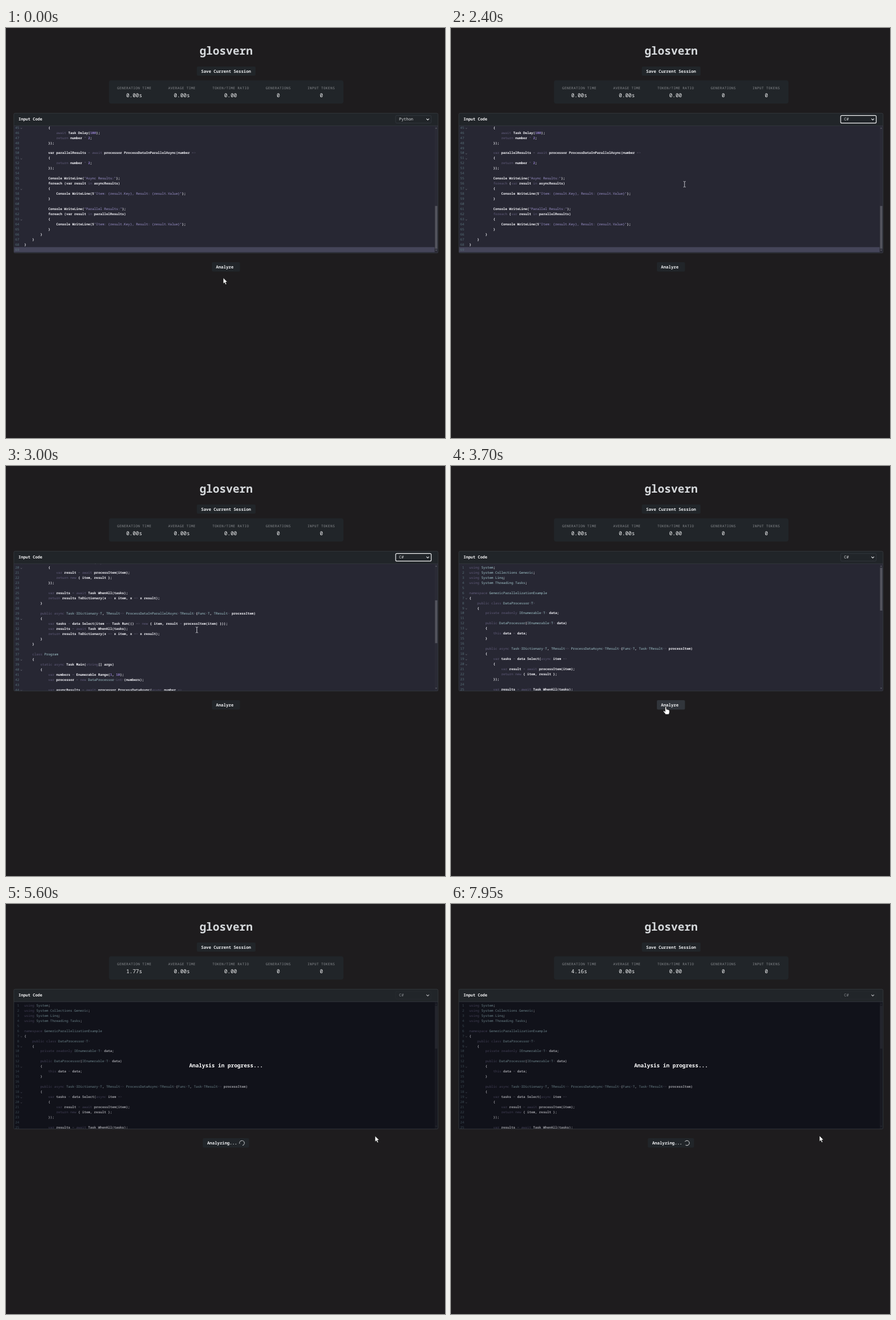
Recreate the animation shown at these times as an HTML page. Size 774 by 723 pixels, loop 8000 ms.

```html
<!DOCTYPE html>
<html lang="en">
<head>
<meta charset="utf-8">
<title>Code analysis</title>
<style>
html, body { margin: 0; width: 100%; height: 100%; overflow: hidden; background: #1e1c1e; }
svg { display: block; width: 774px; height: 723px; }
text { font-family: "Noto Sans Mono", "DejaVu Sans Mono", monospace; white-space: pre; text-rendering: geometricPrecision; }
.b { font-weight: 700; }
.mid { text-anchor: middle; }
.code text { font-size: 5.86px; fill: #f3f3f8; font-weight: 700; }
.code .k { fill: #625d7c; font-weight: 400; }
.code .o { fill: #555366; font-weight: 400; }
.code .t { fill: #a6cbd1; font-weight: 500; }
.code .s { fill: #a096d0; font-weight: 500; }
.code .n { fill: #9480cc; }
.code .ln { fill: #587079; font-weight: 400; text-anchor: end; }
</style>
</head>
<body>
<svg id="stage" viewBox="0 0 774 723"></svg>
<script>
const SOURCE = `using System;
using System.Collections.Generic;
using System.Linq;
using System.Threading.Tasks;

namespace GenericParallelizationExample
{
    public class DataProcessor<T>
    {
        private readonly IEnumerable<T> data;

        public DataProcessor(IEnumerable<T> data)
        {
            this.data = data;
        }

        public async Task<IDictionary<T, TResult>> ProcessDataAsync<TResult>(Func<T, Task<TResult>> processItem)
        {
            var tasks = data.Select(async item =>
            {
                var result = await processItem(item);
                return new { item, result };
            });

            var results = await Task.WhenAll(tasks);
            return results.ToDictionary(x => x.item, x => x.result);
        }

        public async Task<IDictionary<T, TResult>> ProcessDataInParallelAsync<TResult>(Func<T, TResult> processItem)
        {
            var tasks = data.Select(item => Task.Run(() => new { item, result = processItem(item) }));
            var results = await Task.WhenAll(tasks);
            return results.ToDictionary(x => x.item, x => x.result);
        }
    }

    class Program
    {
        static async Task Main(string[] args)
        {
            var numbers = Enumerable.Range(1, 10);
            var processor = new DataProcessor<int>(numbers);

            var asyncResults = await processor.ProcessDataAsync(async number =>
            {
                await Task.Delay(100);
                return number * 2;
            });

            var parallelResults = await processor.ProcessDataInParallelAsync(number =>
            {
                return number * 2;
            });

            Console.WriteLine("Async Results:");
            foreach (var result in asyncResults)
            {
                Console.WriteLine($"Item: {result.Key}, Result: {result.Value}");
            }

            Console.WriteLine("Parallel Results:");
            foreach (var result in parallelResults)
            {
                Console.WriteLine($"Item: {result.Key}, Result: {result.Value}");
            }
        }
    }
}
`.split("\n");

const LANGS = "Python JavaScript TypeScript C++ C C# Java PHP Rust SQL XML CSS JSON Markdown HTML YAML".split(" ");
const LOOP = 8000, STEP = 50, OPEN = 950, PICK = 2150, BLUR = 3650, BUSY = 3900;
const LINE = 8.975, CHAR = 3.516, MAX_SCROLL = 398, ROW = 9.24;

const stage = document.getElementById("stage");

function el(parent, tag, attrs = {}, content) {
  const node = document.createElementNS("http://www.w3.org/2000/svg", tag);
  for (const key in attrs) node.setAttribute(key, attrs[key]);
  if (content !== undefined) node.textContent = content;
  parent.appendChild(node);
  return node;
}
const box = (parent, x, y, width, height, fill, more = {}) =>
  el(parent, "rect", { x, y, width, height, fill, ...more });
const label = (parent, x, y, size, fill, content, more = {}) =>
  el(parent, "text", { x, y, "font-size": size, fill, ...more }, content);
const show = (node, on) => node.setAttribute("display", on ? "inline" : "none");
const move = (node, x, y) => node.setAttribute("transform", `translate(${x} ${y})`);

// Syntax colouring
const KEYWORDS = {
  py: /^(await|async|return|in|class)$/,
  cs: /^(using|namespace|public|private|readonly|class|this|async|await|var|return|new|static|string|int|foreach|in)$/
};
const TYPES = /^(System|Collections|Generic|Linq|Threading|Tasks|GenericParallelizationExample|DataProcessor|IEnumerable|IDictionary|TResult|T|Func|Program)$/;

function tokenClass(token, rest, mode) {
  if (token[0] === '"') return "s";
  if (/^\d/.test(token)) return "n";
  if (KEYWORDS[mode].test(token)) return "k";
  if (/^[.=<>*]+$/.test(token)) return "o";
  if (mode === "cs" && (TYPES.test(token) || /^Task</.test(token + rest) || /^Process\w+</.test(token + rest))) return "t";
  return "";
}

function codeView(parent, mode) {
  const view = el(parent, "g");
  SOURCE.forEach((line, i) => {
    const y = 180.7 + i * LINE, body = line.trim();
    el(view, "text", { x: 23.3, y, class: "ln" }, i + 1);
    if (body === "{" || (mode === "cs" && /=>$/.test(body)))
      el(view, "path", { d: `M25.7 ${y - 1.2}l1.3 1.2 1.3-1.2`, fill: "none", stroke: "#747783", "stroke-width": .7 });
    if (!body) return;
    const text = el(view, "text", { x: 32.3 + line.search(/\S/) * CHAR, y });
    for (const m of body.matchAll(/"[^"]*"|\w+|[.=<>*]+|\s+|[^\w\s.=<>*"]+/g)) {
      const rest = body.slice(m.index + m[0].length);
      el(text, "tspan", { class: tokenClass(m[0], rest, mode) }, m[0]);
    }
  });
  return view;
}

// Page header and statistics
box(stage, 0, 0, 774, 723, "#1e1c1e");
label(stage, 388, 46.5, 19.55, "#d6d9dc", "glosvern", { class: "b mid" });
box(stage, 336.5, 68, 103.5, 16, "#212529", { rx: 2 });
label(stage, 388, 78.5, 7.33, "#eeeff1", "Save Current Session", { class: "mid", "font-weight": 600 });
box(stage, 181.5, 92.3, 413.5, 41, "#212529", { rx: 4 });
const stats = [
  ["GENERATION TIME", 196, 226, "0.00s"], ["AVERAGE TIME", 286, 310, "0.00s"],
  ["TOKEN/TIME RATIO", 364, 396, "0.00"], ["GENERATIONS", 458, 480, "0"], ["INPUT TOKENS", 531.6, 556, "0"]
].map(([name, x, center, value]) => {
  label(stage, x, 108, 6.03, "#8b8e92", name, { "letter-spacing": .42 });
  return label(stage, center, 121.7, 9.4, "#f3f4f5", value, { class: "mid", "font-weight": 500 });
});

// Editor
const defs = el(stage, "defs");
box(el(defs, "clipPath", { id: "pane" }), 14, 172.5, 748, 224);
box(stage, 13.8, 150.3, 748, 246.5, "#212529", { rx: 2 });
const paper = box(stage, 14, 172.3, 747.7, 224.3, "#272733");
const pane = el(stage, "g", { "clip-path": "url(#pane)" });
const scroller = el(pane, "g", { class: "code" });
box(scroller, 14, 174.1 + 68 * LINE, 742, LINE, "#454559");
const views = { py: codeView(scroller, "py"), cs: codeView(scroller, "cs") };
const bar = el(pane, "g");
box(bar, 755.7, 172.5, 6, 224, "#2b2b36");
el(bar, "path", { d: "M756.8 177.5l1.6-2 1.6 2zM756.8 391l1.6 2 1.6-2z", fill: "#61626b" });
const thumb = box(bar, 756.5, 0, 4, 75.5, "#54555e");
el(stage, "path", { d: "M14 172.3H762", stroke: "#373a42", "stroke-width": .8 });
box(stage, 13.8, 150.3, 748, 246.5, "none", { rx: 2, stroke: "#383b42", "stroke-width": .8 });
label(stage, 22, 163.4, 7, "#f7f7f8", "Input Code", { class: "b" });
const notice = label(stage, 388, 287.7, 9.45, "#ffffff", "Analysis in progress...", { class: "b mid" });

// Language select
const select = box(stage, 687, 154.3, 62.7, 13.4, "#212529", { rx: 2 });
const choice = label(stage, 693, 163.3, 6.95, "#e3e5e7", "Python", { "font-weight": 500 });
const chevron = el(stage, "path", { d: "M741.2 159.8l2.4 2.4 2.4-2.4", fill: "none", "stroke-width": 1.1 });
const menu = el(stage, "g");
box(menu, 686, 169, 65, 150, "#000", { rx: 3, opacity: .22 });
box(menu, 687, 168.3, 62.6, 148.5, "#111114", { rx: 2, stroke: "#33353a", "stroke-width": .6 });
const marker = box(menu, 687.2, 0, 62.2, ROW, "#1c66cf");
LANGS.forEach((name, i) => label(menu, 693, 175.7 + i * ROW, 6.85, "#eeeeef", name, { "font-weight": 500 }));

// Analyze button
const button = box(stage, 363, 413, 49.5, 16.5, "#212529", { rx: 2 });
const action = label(stage, 370.3, 424, 7.33, "#eeeff1", "Analyze", { "font-weight": 600 });
const spinner = el(stage, "path", { d: "M3.03-3.03A4.28 4.28 0 1 0 3.03 3.03", fill: "none", stroke: "#e8e9eb", "stroke-width": .9 });

// Pointers
const outline = { fill: "#fff", stroke: "#111", "stroke-width": .7, "stroke-linejoin": "round" };
const pointers = {
  arrow: el(stage, "path", { d: "M0 0V10.4L2.4 8.3 4 12 5.9 11.2 4.3 7.5H7.5Z", ...outline }),
  beam: el(stage, "path", { d: "M-2-5Q0-5 0-4 0-5 2-5M0-4V4M-2 5Q0 5 0 4 0 5 2 5", fill: "none", stroke: "#d4d4da", "stroke-width": .9 }),
  hand: el(stage, "path", { d: "M-1.2 0Q0-1.2 1.2 0V4.2Q2.4 3.3 3.2 4.6 4.5 4 5 5.2 6.5 5 6.6 6.5V9.3Q6.5 11.5 5.2 13H-.5Q-1.5 10.8-4 8.3-4.9 6.6-3.2 6.6L-1.2 8.1Z", ...outline })
};

// Interpolates rows of [time, ...values]
function track(rows, t, ease = u => u) {
  if (t <= rows[0][0]) return rows[0].slice(1);
  const i = rows.findIndex(row => row[0] > t);
  if (i < 0) return rows[rows.length - 1].slice(1);
  const a = rows[i - 1], b = rows[i], u = ease((t - a[0]) / (b[0] - a[0]));
  return a.slice(1).map((v, k) => v + (b[k + 1] - v) * u);
}
const smooth = u => u * u * (3 - 2 * u);

const PATH = [
  [0, 383, 440.5], [450, 600, 260], [700, 718, 140], [850, 720, 163], [1300, 720, 163],
  [1550, 717, 210], [1650, 719, 238], [1750, 716, 221], [PICK, 716, 221], [2500, 336.5, 289],
  [3300, 336.5, 289], [3600, 378.6, 425], [BUSY, 378.6, 425], [4150, 420, 462],
  [4500, 518.5, 453], [4700, 560, 445], [5300, 657, 412], [5700, 649.5, 408.5]
];
const SCROLL = [[2400, MAX_SCROLL], [2700, 229.4], [2900, 170], [3150, 170], [3500, 0]];
const TIMER = [[3820, 0], [4500, .68], [6800, 2.96], [7950, 4.16]];

function render(t) {
  const picked = t >= PICK, busy = t >= BUSY, open = t >= OPEN && !picked;
  const [x, y] = track(PATH, t, smooth);
  const [scroll] = track(SCROLL, t);

  stats[0].textContent = (busy ? track(TIMER, t)[0] : 0).toFixed(2) + "s";

  move(scroller, 0, -scroll);
  show(views.py, !picked);
  show(views.cs, picked);
  thumb.setAttribute("y", 179.5 + scroll / MAX_SCROLL * 134.3);
  paper.setAttribute("fill", busy ? "#11121a" : "#272733");
  pane.setAttribute("opacity", busy ? .62 : 1);
  bar.setAttribute("opacity", busy ? .5 : 1);
  show(notice, busy);

  const focused = picked && t < BLUR;
  select.setAttribute("stroke", focused ? "#f1f2f3" : busy ? "#292d32" : "#393e45");
  select.setAttribute("stroke-width", focused ? 1.2 : .7);
  choice.textContent = picked ? "C#" : "Python";
  choice.setAttribute("fill", busy ? "#8d9095" : "#e3e5e7");
  chevron.setAttribute("stroke", busy ? "#b4b6ba" : "#e3e5e7");
  show(menu, open);
  const row = Math.max(0, Math.min(LANGS.length - 1, Math.floor((y - 168.7) / ROW)));
  marker.setAttribute("y", 168.7 + row * ROW);

  const hover = !busy && x > 363 && x < 412.5 && y > 413 && y < 429.5;
  button.setAttribute("x", busy ? 347 : 363);
  button.setAttribute("width", busy ? 81.5 : 49.5);
  button.setAttribute("fill", hover ? "#31353b" : "#212529");
  action.setAttribute("x", busy ? 354.7 : 370.3);
  action.textContent = busy ? "Analyzing..." : "Analyze";
  show(spinner, busy);
  spinner.setAttribute("transform", `translate(416 421.5) rotate(${(t - 3850) / 750 * 360 % 360})`);

  const inCode = !open && !busy && x < 756 && y > 172 && y < 397;
  const kind = hover ? "hand" : inCode ? "beam" : "arrow";
  for (const name in pointers) {
    show(pointers[name], name === kind);
    move(pointers[name], x, y);
  }
}

const start = performance.now();
function tick(now) {
  const elapsed = Math.max(0, now - start) % LOOP;
  render(Math.floor(elapsed / STEP) * STEP);
  requestAnimationFrame(tick);
}
render(0);
requestAnimationFrame(tick);
</script>
</body>
</html>
```
